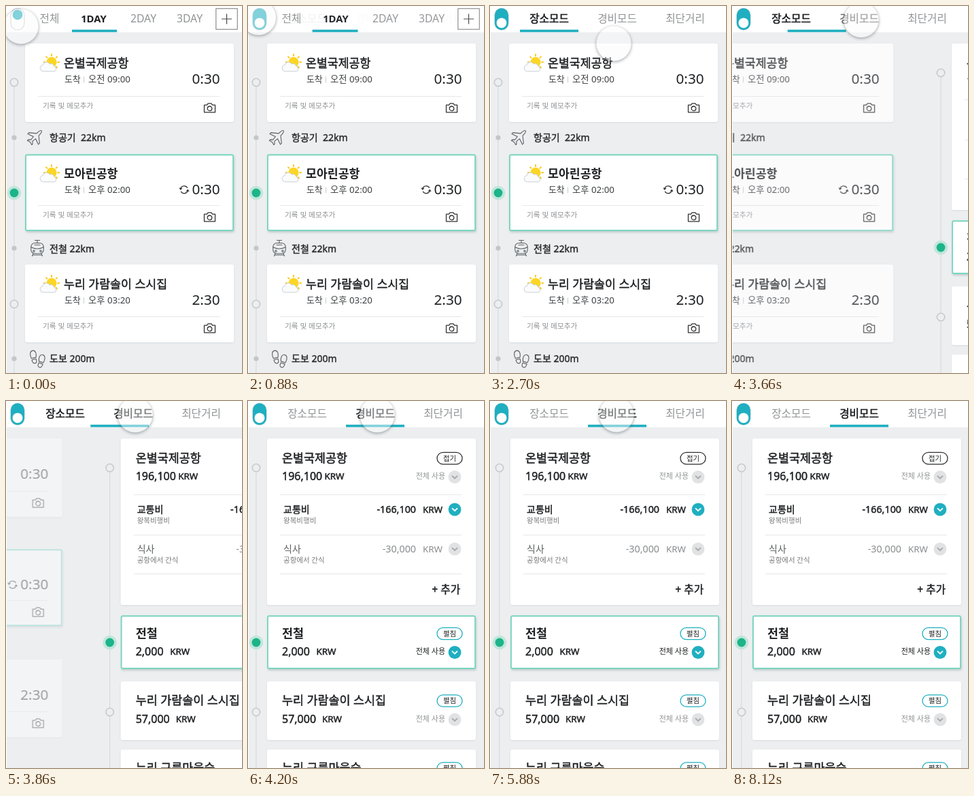
These frames come from a looping animation (347 px wide and 538 px high, 8.14 s). An HTML page:

```html
<!DOCTYPE html>
<html lang="ko">
<head>
<meta charset="utf-8">
<title>여행 일정</title>
<style>
  html, body { margin: 0; width: 100%; height: 100%; overflow: hidden; background: #fff; }
  svg { display: block; width: 347px; height: 538px; }
  text { font-family: "Noto Sans", "Noto Sans CJK KR", "Noto Sans CJK", sans-serif; white-space: pre; }
  .line { fill: none; stroke: #5b6064; stroke-width: 1.1; stroke-linejoin: round; stroke-linecap: round; }
</style>
</head>
<body>
<svg id="stage" viewBox="0 0 347 538" xmlns="http://www.w3.org/2000/svg"></svg>
<script>
const LOOP = 8140;
const TEAL = '#1fafc0', INK = '#1d1f21', GREY = '#929496', BG = '#eceef0';

// y is the optical middle of the text; weight 500 is regular with a thin outline
function text(x, y, size, str, fill = INK, weight = 400, anchor = 'start') {
  const medium = weight === 500;
  const outline = medium ? `stroke="${fill}" stroke-width="0.45"` : '';
  return `<text x="${x}" y="${y + size * 0.36}" font-size="${size}" fill="${fill}" font-weight="${medium ? 400 : weight}" text-anchor="${anchor}" ${outline}>${str}</text>`;
}
const rect = (x, y, w, h, fill, extra = '') =>
  `<rect x="${x}" y="${y}" width="${w}" height="${h}" fill="${fill}" ${extra}/>`;
const circle = (x, y, r, fill, extra = '') =>
  `<circle cx="${x}" cy="${y}" r="${r}" fill="${fill}" ${extra}/>`;
const path = (d, extra = 'class="line"') => `<path d="${d}" ${extra}/>`;
const at = (x, y, body) => `<g transform="translate(${x} ${y})">${body}</g>`;

const card = (y, h, active) => active
  ? rect(29, y + 1.2, 305, h - 2.2, '#fff', 'rx="2" stroke="#7bd5c0" stroke-width="1.9" filter="url(#glow)"')
  : rect(28, y, 307, h, '#fff', 'rx="3" filter="url(#soft)"');
const rule = y => rect(47, y, 267, 1, '#e6e7e8');

const openDot = y => circle(12, y, 5.7, BG, 'stroke="#c6cacc" stroke-width="1.6"');
const smallDot = y => circle(12, y, 3.6, '#c3c7c9');
const activeDot = y => circle(12, y, 10.3, '#c0e6da') + circle(12, y, 6.4, '#1cb489');
const rail = y => rect(11.5, y, 1, 538 - y, '#d4d7d9');

function weather() {
  let rays = '';
  for (let a = 0; a < 360; a += 45)
    rays += `<path d="M0 -9.4V-11.2" stroke="#f8c81e" stroke-width="2" stroke-linecap="round" transform="rotate(${a})"/>`;
  return at(67, 83, rays + circle(0, 0, 7.6, '#fcd625')) +
    path('M54.5 96.5a4.6 4.6 0 0 1-.6-9.1a5.6 5.6 0 0 1 10.4-1.6a4.6 4.6 0 0 1 6.6 3.4a3.8 3.8 0 0 1 .3 7.3z',
      'fill="#fafbfc" stroke="#c9d0d6" stroke-width="1"');
}

const camera = at(299.5, 149.5,
  path('M-8 -4.3h4l1.6 -2.4h4.8l1.6 2.4h4v10.6h-16z', 'fill="none" stroke="#333" stroke-width="1.3" stroke-linejoin="round"') +
  circle(0, 0.8, 3.3, 'none', 'stroke="#333" stroke-width="1.3"'));

const refresh = at(262, 108,
  path('M-5.2 -1.5A5.4 5.4 0 0 1 4.8 -2.5M5.2 1.5A5.4 5.4 0 0 1 -4.8 2.5', 'fill="none" stroke="#333" stroke-width="1.3"') +
  path('M-7.6 -2.8L-5.4 .8L-2.6 -2.2zM7.6 2.8L5.4 -.8L2.6 2.2z', 'fill="#333"'));

const plane = at(43, 192, `<g transform="rotate(45)">${path(
  'M0 -13C2 -13 2.2 -9 2.2 -5L11 2V4.5L2.2 1.5L1.6 7.5L4.5 10V11.8L0 10.6L-4.5 11.8V10L-1.6 7.5L-2.2 1.5L-11 4.5V2L-2.2 -5C-2.2 -9 -2 -13 0 -13Z')}</g>`);

const train = at(46, 355,
  rect(-9.2, -7.5, 18.4, 15.5, 'none', 'rx="5.5" class="line"') +
  path('M-9 -1.5Q0 3.5 9 -1.5M-3.5 -11.5H3.5M0 -11.5V-7.5M-4 -4.8H4M-6 8L-7.5 11.5M6 8L7.5 11.5M-6.8 10H6.8') +
  circle(-5, 4.2, 1.2, 'none', 'class="line"') + circle(5, 4.2, 1.2, 'none', 'class="line"'));

const sole = path('M-4 2C-6 -4 -4.5 -9 -.5 -9C4 -9 4.5 -3 2.8 1.5ZM-3.6 4.2L2.6 3.6C3.6 8 2.4 10 .2 10C-2.2 10 -3.4 8 -3.6 4.2Z');
const steps = at(41, 514, `<g transform="rotate(-8)">${sole}</g>`) +
  at(51.5, 520, `<g transform="scale(-1 1) rotate(-12)">${sole}</g>`);

// the footer hangs from the bottom edge of its card
function stop(top, height, name, time, span, active) {
  const head = weather() +
    text(85, 84, 17.3, name, INK, active ? 700 : 500) +
    text(86, 108, 12.9, '도착', '#3b3d3f') + rect(114, 104, 1, 9, '#c9cbcd') +
    text(121, 108, 13.3, time, '#3b3d3f') +
    text(273.5, 107.5, 20.7, span) + (active ? refresh : '');
  const foot = rule(132) + text(54, 146, 10.7, '기록 및 메모추가', '#8d8f91') + camera;
  return card(top, height, active) + at(0, top - 55.7, head) + at(0, top + height - 170, foot);
}
const leg = (y, str) => text(64, y, 14, str, '#2b2d2f', 500);

const placePage = rail(112) +
  openDot(112) + smallDot(193) + activeDot(274) + smallDot(355) + openDot(437) + smallDot(517) +
  stop(55, 115, '온별국제공항', '오전 09:00', '0:30') +
  stop(217, 113, '모아린공항', '오후 02:00', '0:30', true) +
  stop(379, 114, '누리 가람솔이 스시집', '오후 03:20', '2:30') +
  plane + leg(193, '항공기  22km') + train + leg(356, '전철 22km') + steps + leg(517, '도보 200m');

const chevron = (y, on) => circle(304, y, 9.4, on ? TEAL : '#e1e2e3') +
  path(`M300 ${y - 1.8}l4 3.8l4 -3.8`, `fill="none" stroke="${on ? '#fff' : '#a5a7a9'}" stroke-width="1.8"`);
const pill = (y, str, color) =>
  rect(278, y - 8.7, 37, 17.4, '#fff', `rx="8.7" stroke="${color}" stroke-width="1.3"`) +
  text(296.5, y, 10.4, str, INK, 400, 'middle');

function expense(y, name, sum, button, on) {
  return text(50, y, 17.4, name, INK, on ? 700 : 500) +
    pill(y + .5, button, button === '접기' ? '#333' : TEAL) +
    (sum ? text(50, y + 27, 16, sum, INK, 500) +
      text(50 + sum.length * 8.5 + (sum.length > 6 ? 3 : 8), y + 27, 13.4, 'KRW', INK, 500) +
      text(290, y + 27, 11, '전체 사용', on ? INK : GREY, 400, 'end') + chevron(y + 28, on) : '');
}
function item(y, name, note, sum, on) {
  const color = on ? INK : '#898b8d', weight = on ? 500 : 400;
  return text(52, y, 14, name, on ? INK : '#5d5f61', weight) +
    text(52, y + 16.5, 10.5, note, '#77797b') +
    text(247, y + .5, 14.3, sum, color, weight, 'end') + text(257, y + .5, 13.4, 'KRW', color, weight) + chevron(y + .5, on);
}

const costPage = rail(98) + openDot(98) + activeDot(354) + openDot(456) +
  card(55, 244) + card(314, 79, true) + card(411, 86) + card(511, 60) +
  expense(83.5, '온별국제공항', '196,100', '접기') +
  rule(137) + item(158.5, '교통비', '왕복비행비', '-166,100', true) +
  rule(196) + item(216.5, '식사', '공항에서 간식', '-30,000') +
  rule(253) + text(312, 276, 15.6, '+ 추가', INK, 500, 'end') +
  expense(340.5, '전철', '2,000', '펼침', true) +
  expense(439, '누리 가람솔이 스시집', '57,000', '펼침') +
  expense(538, '누리 구름마을숲', '', '펼침');

const tab = (x, str, color = GREY, weight = 400, id = '') =>
  `<g ${id && `id="${id}"`}>${text(x, 18.5, 15.7, str, color, weight, 'middle')}</g>`;
const dayTabs = tab(64, '전체') + text(129, 18.5, 14.8, '1DAY', INK, 700, 'middle') + tab(202, '2DAY') + tab(270, '3DAY') +
  rect(308.8, 3.8, 31.4, 30.4, '#fff', 'stroke="#777" stroke-width="1"') +
  path('M317 19H332M324.5 11.5V26.5', 'stroke="#444" stroke-width="1.2"');
const modeTabs = tab(87, '장소모드') + tab(87, '장소모드', INK, 500, 'placeOn') +
  tab(187, '경비모드') + tab(187, '경비모드', INK, 500, 'costOn') + tab(287, '최단거리');

const stage = document.getElementById('stage');
stage.innerHTML = `<defs>
  <filter id="soft" x="-5%" y="-10%" width="110%" height="125%"><feDropShadow dx="0" dy="1" stdDeviation="1" flood-color="#8a9298" flood-opacity=".2"/></filter>
  <filter id="glow" x="-5%" y="-10%" width="110%" height="125%"><feDropShadow dx="1" dy="2" stdDeviation="1.8" flood-color="#6d8a8c" flood-opacity=".35"/></filter>
  <filter id="blur" x="-30%" y="-30%" width="160%" height="160%"><feGaussianBlur stdDeviation="2"/></filter>
  <mask id="ring">${rect(-45, -45, 90, 90, '#fff')}${circle(0, 0, 25.5, '#000')}</mask>
</defs>
${rect(0, 0, 347, 538, BG)}
<g id="place">${placePage}</g><g id="cost">${costPage}</g>
${rect(0, 0, 1, 538, '#fff')}${rect(0, 0, 347, 38.5, '#fff')}
<g id="days">${dayTabs}</g><g id="modes">${modeTabs}</g>
<rect id="bar" y="34.7" height="3.6" fill="${TEAL}"/>
${rect(7, 3.5, 20, 31.5, '#fff', 'rx="10" stroke="#c5cacd" stroke-width="1.2"')}
${rect(7, 3.2, 20, 32, TEAL, 'rx="10" id="pillOn"')}
${circle(17, 13, 7.4, TEAL, 'id="knobOff"')}${circle(17, 13, 7.4, '#fff', 'id="knobOn"')}
<g id="touch"><g mask="url(#ring)">${circle(0, 1.2, 26, '#555b60', 'opacity=".5" filter="url(#blur)"')}</g>
${circle(0, 0, 25.7, '#fafafa', 'fill-opacity=".45"')}</g>`;

const $ = id => document.getElementById(id);
const set = (id, attrs) => { for (const k in attrs) $(id).setAttribute(k, attrs[k]); };
const ease = (t, a, b) => {
  const p = Math.min(1, Math.max(0, (t - a) / (b - a)));
  return p * p * (3 - 2 * p);
};
const mix = (a, b, p) => a + (b - a) * p;

// time, x, y
const touchPath = [
  [0, 22, 30], [500, 15.5, 17], [1680, 15.5, 17], [2560, 182, 55],
  [2740, 182, 55], [3240, 190, 20.5], [4240, 190, 20.5], [4900, 186, 20], [LOOP, 186, 20]
];
function touchAt(t) {
  const i = touchPath.findIndex(k => k[0] > t);
  const [t0, x0, y0] = touchPath[i - 1], [t1, x1, y1] = touchPath[i];
  const p = ease(t, t0, t1);
  return [mix(x0, x1, p), mix(y0, y1, p)];
}

function draw(now) {
  const t = now % LOOP;

  const on = ease(t, 600, 880);
  const knobY = mix(12.8, 24.8, on);
  set('pillOn', { opacity: on });
  set('knobOff', { cy: knobY, opacity: 1 - on });
  set('knobOn', { cy: knobY, opacity: on });

  const mode = ease(t, 820, 1300);
  set('days', { opacity: 1 - mode });
  set('modes', { opacity: mode });

  const move = ease(t, 3380, 4053);
  set('bar', { x: mix(97, 44, mode) + 100 * move, width: mix(66, 86, mode) });
  set('costOn', { opacity: ease(t, 3500, 3860) });
  set('placeOn', { opacity: 1 - ease(t, 3860, 4140) });

  const slide = ease(t, 3420, 4160);
  const settle = 2 * ease(t, 4240, 4900);
  set('place', { transform: `translate(${-393 * slide} 0)`, opacity: 1 - 0.95 * slide });
  set('cost', { transform: `translate(${393 * (1 - slide) + settle} 0)` });

  set('touch', { transform: `translate(${touchAt(t).join(' ')})`, opacity: 1 - ease(t, 5900, 6600) });
}

const start = performance.now();
function frame() {
  draw(performance.now() - start);
  requestAnimationFrame(frame);
}
frame();
</script>
</body>
</html>
```
